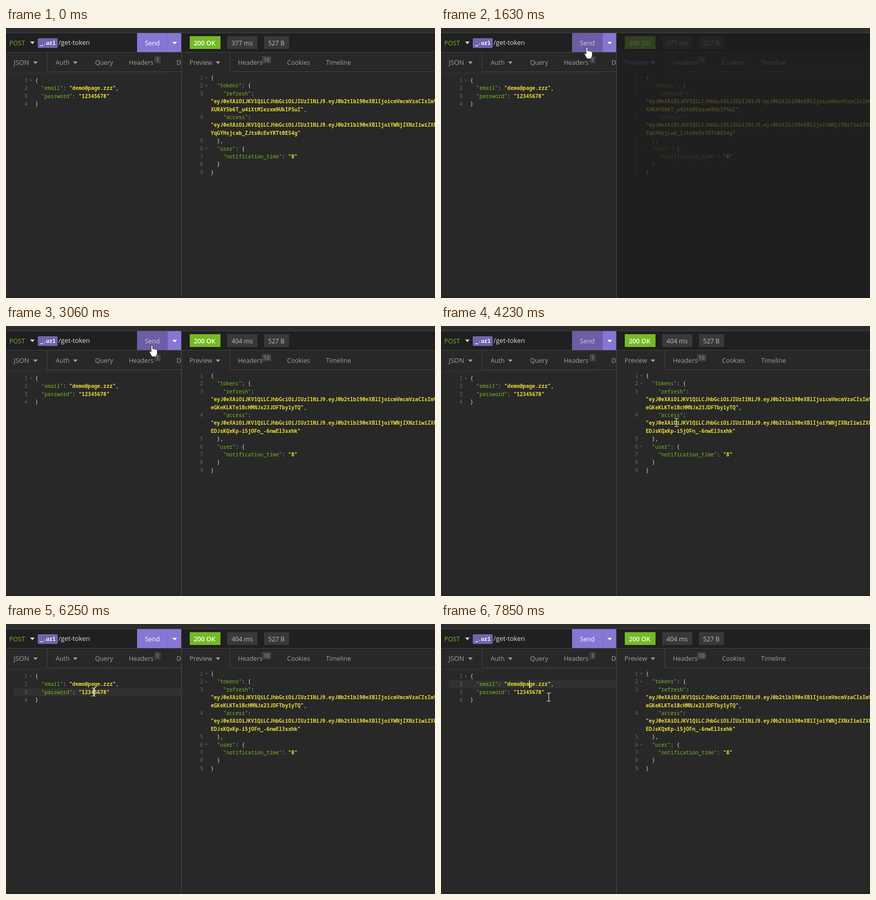
An HTML page for the animation above (8 s loop, 838 by 528 pixels).

```html
<!DOCTYPE html>
<html lang="en">
<head>
<meta charset="utf-8">
<title>Request client</title>
<style>
html, body { margin: 0; width: 100%; height: 100%; overflow: hidden; background: #282828; }
svg { display: block; width: 838px; height: 528px; }
text { white-space: pre; font: 12.3px "Open Sans", "Noto Sans", sans-serif; fill: #a0a0a0; }
.code, .code text { font: 10.08px "Noto Sans Mono", "DejaVu Sans Mono", monospace; fill: #e0e0e0; }
.code .num { fill: #686868; text-anchor: end; }
.code .key { fill: #75ba24; }
.code .str { fill: #e6d938; font-weight: 700; }
.badge { font-size: 10px; }
.tri { fill: #a0a0a0; }
.fold { fill: #585858; }
</style>
</head>
<body>
<svg viewBox="0 0 838 528">
  <defs><clipPath id="left"><rect width="342" height="528"/></clipPath></defs>
  <rect width="838" height="528" fill="#282828"/>
  <rect width="838" height="10" fill="#2d2d2d"/>
  <rect y="10" width="838" height="37" fill="#202020"/>
  <rect y="524" width="838" height="4" fill="#242424"/>
  <path d="M0 9.5H838M0 47.5H838M80.500 48V85.500H342M437.500 48V85.500H838" fill="none" stroke="#444"/>
  <g clip-path="url(#left)">
    <rect id="bar" y="86" width="310" height="5"/>
    <rect id="row" x="15" width="327" height="15.400" fill="#313131"/>
    <g id="request"></g>
    <g id="body" class="code"></g>
    <rect id="caret" x="172" width="1.200" height="15" fill="#f4f4f4"/>
  </g>
  <g id="response"></g>
  <g id="reply" class="code"></g>
  <rect id="veil" x="343" y="10" width="495" height="518" fill="#1c1c1c"/>
  <path d="M342.500 10V528" stroke="#4c4c4c"/>
  <circle id="ring" r="11.500" fill="#e6cf14" opacity=".72"/>
  <g id="pointer" stroke-linejoin="round">
    <path id="arrow" d="M0 0V16.500L3.800 13L6.300 18.700L9 17.500L6.500 12H11.700Z" fill="#fff" stroke="#222" stroke-width=".8"/>
    <path id="hand" d="M-1.600 1.500C-1.600-.500 1.600-.500 1.600 1.500V7C2 5.500 4.500 5.800 4.700 7.500C5.500 6.300 7.500 6.800 7.700 8.300C8.600 7.500 10.500 8 10.500 10V15C10.500 18 8.800 19 8.500 22H-.300C-.700 19.500-3.500 16.500-4.500 13.500C-5.300 11-3 10.500-1.600 13Z" fill="#fff" stroke="#222" stroke-width=".9"/>
    <path id="beam" d="M-4-8H-1.500L0-7L1.500-8H4M0-7V7M-4 8H-1.500L0 7L1.500 8H4" fill="none" stroke="#e2e2e2" stroke-width="1.200"/>
  </g>
</svg>
<script>
const $ = id => document.getElementById(id);
const LOOP = 8000, STEP = 70, PITCH = 15.4;

const rect = (x, y, w, h, fill, more = '') =>
  `<rect x="${x}" y="${y}" width="${w}" height="${h}" fill="${fill}" ${more}/>`;
const label = (x, y, s, more = '') => `<text x="${x}" y="${y}" ${more}>${s}</text>`;
const tri = (x, y, w = 9, h = 5, more = 'class="tri"') =>
  `<path d="M${x} ${y}h${w}l${-w / 2} ${h}z" ${more}/>`;
const badge = (x, w, s) =>
  rect(x, 55, w, 14, '#414141', 'rx="2"') +
  label(x + w / 2, 65.7, s, 'class="badge" text-anchor="middle"');

// Colours one line: indent, key, colon, value, punctuation
function tint(line) {
  const [, pad, key = '', colon, value, tail] =
    line.match(/^(\s*)("\w+"(?=:))?(:? ?)(.*?)([,{}]*)$/);
  return `${pad}<tspan class="key">${key}</tspan>${colon}<tspan class="str">${value}</tspan>${tail}`;
}

// Each row is "number|text"; folds lists the rows with an arrow
function listing(rows, x, y, numX, folds) {
  return rows.map((row, i) => {
    const [num, line] = row.split('|'), base = y + i * PITCH;
    return label(numX, base, num, 'class="num"') +
      label(x, base, tint(line), 'xml:space="preserve"');
  }).join('') + `<g class="folds">${folds.map(i =>
    tri(numX + 4, y - 5 + i * PITCH, 5, 3, 'class="fold"')).join('')}</g>`;
}

const HEAD = '"eyJ0eXAiOiJKV1QiLCJhbGciOiJIUzI1NiJ9.eyJ0b2tlbl90eXBlIjoi';
const reply = (refresh, access) => listing([
  '1|{', '2|  "tokens": {',
  '3|    "refresh":', `|${HEAD}cmVmcmVzaCIsImV4c`, `|${refresh}",`,
  '4|    "access":', `|${HEAD}YWNjZXNzIiwiZXhwI`, `|${access}"`,
  '5|  },', '6|  "user": {', '7|    "notification_time": "8"', '8|  }', '9|}'
], 400, 101, 385, [0, 1, 9]);

$('request').innerHTML =
  label(6.5, 34, 'POST', 'style="fill:#75ba24"') + tri(47, 26.5, 9, 5, 'fill="#ddd"') +
  rect(62, 20, 39, 19, '#7363ab', 'rx="2"') +
  `<g class="code">${label(66.500, 33, '_.url', 'style="fill:#fff;font-weight:700"')}</g>` +
  label(102.5, 33.3, '/get-token', 'style="fill:#ddd;font-size:12.8px"') +
  rect(256, 10, 86, 37, '#8776d5') + rect(256, 10, 60, 37, '#8776d5', 'id="send"') +
  rect(315.5, 10, 1, 37, '#7b6bc2') +
  label(271.5, 34, 'Send', 'id="sendText"') + tri(325, 27, 9, 5, 'fill="#fff"') +
  label(15, 72, 'JSON', 'style="font-size:12.8px"') + tri(53, 65.5) +
  label(97, 72, 'Auth') + tri(131, 65.5) + label(174, 72, 'Query') +
  label(240, 72, 'Headers') + badge(290, 12, '1') + label(333, 72, 'Docs');

$('body').innerHTML = listing(
  ['1|{', '2|  "email": "demo@page.zzz",', '3|  "password": "12345678"', '4|}'],
  57, 106, 42, [0]);

$('response').innerHTML =
  rect(359, 16, 60, 25, '#75ba24') +
  label(367, 34, '200 OK', 'style="fill:#fff;font-weight:600"') +
  rect(432, 16, 59, 25, '#393939') + label(440.5, 34, '', 'id="timing" style="fill:#bbb"') +
  rect(504, 16, 49, 25, '#393939') + label(512, 34, '527 B', 'style="fill:#bbb"') +
  label(358.5, 72, 'Preview') + tri(409.5, 65.5) + label(453, 72, 'Headers') +
  badge(500, 18, '10') + label(549, 72, 'Cookies') + label(625, 72, 'Timeline');

// Pointer path: time, x, y
const path = [
  [400, 763, 512], [610, 610, 335], [820, 430, 170], [960, 335, 88], [1150, 286, 47],
  [1220, 285, 41], [1290, 285, 38], [3670, 285, 38], [3810, 312, 70], [3950, 368, 126],
  [4160, 450, 185], [4440, 490, 200], [4650, 470, 140], [4860, 405, 152], [5060, 420, 252],
  [5270, 367, 226], [5340, 335, 218], [5480, 258, 197], [5700, 176, 152], [5800, 156, 134],
  [5910, 171, 133], [6250, 171, 133], [6530, 172, 121], [6800, 172, 121], [7010, 262, 192],
  [7290, 448, 291], [7500, 434, 285], [7570, 400, 262], [7710, 268, 178], [7850, 210.5, 143]
];

const clamp = v => Math.min(1, Math.max(0, v));
const ramp = (t, a, b) => clamp((t - a) / (b - a));
const during = (t, a, b) => t >= a && t < b;
const show = (el, on) => el.setAttribute('visibility', on ? 'visible' : 'hidden');
const mix = (a, b, k) => `rgb(${a.map((v, i) => Math.round(v + (b[i] - v) * k))})`;

function pointerAt(t) {
  const i = path.findIndex(p => p[0] > t);
  if (i < 0) return path[path.length - 1].slice(1);
  const [t0, x0, y0] = path[Math.max(0, i - 1)], [t1, x1, y1] = path[i];
  const n = Math.max(1, Math.round((t1 - t0) / STEP));
  const k = Math.floor(ramp(t, t0, t1) * n + 1e-6) / n;
  return [x0 + (x1 - x0) * k, y0 + (y1 - y0) * k];
}

function shapeAt(x, y) {
  if (x > 256 && x < 342 && y < 46) return 'hand';
  const gutter = x < 52 || (x > 338 && x < 396);
  return y > 90 && !gutter ? 'beam' : 'arrow';
}

let shown = null;
function setReply(fresh) {
  if (fresh === shown) return;
  shown = fresh;
  $('timing').textContent = fresh ? '404 ms' : '377 ms';
  $('reply').innerHTML = fresh
    ? reply('eGKeKLKTe1BcHMNJx23JDFTby1yTQ', 'EDJsKQxKp-i5jOFn_-6nwEl3sxhk')
    : reply('XURAY5b6T_u4iXtMIezxm9UkIPSuI', 'YqGYHsjcab_ZJts0cEeYRTt0E54g');
}

function draw(t) {
  const [x, y] = pointerAt(t), shape = shapeAt(x, y), moving = t >= 400;
  show($('pointer'), moving);
  $('pointer').setAttribute('transform', `translate(${x} ${y})`);
  for (const id of ['arrow', 'hand', 'beam'])
    $(id).style.display = id === shape ? '' : 'none';

  const overTabs = moving && x < 342 && y >= 46 && y < 92;
  $('bar').setAttribute('fill', overTabs ? '#444' : '#2c2c2c');

  const dark = ramp(t, 1150, 1220) - ramp(t, 6110, 6250);
  $('send').setAttribute('fill', mix([135, 118, 213], [108, 93, 166], dark));
  $('sendText').style.fill = mix([255, 255, 255], [205, 200, 222], dark);

  setReply(t >= 2860);
  show($('reply').querySelector('.folds'), !during(t, 2860, 3340));
  $('veil').setAttribute('opacity', 0.76 * (ramp(t, 1340, 1630) - ramp(t, 2790, 3060)));

  show($('ring'), during(t, 1290, 1430) || during(t, 6110, 6250) || during(t, 6730, 6870));
  $('ring').setAttribute('cx', x);
  $('ring').setAttribute('cy', y + 1);

  const top = t < 6800 ? 125.6 : 110.2;
  $('row').setAttribute('y', top);
  $('caret').setAttribute('y', top);
  show($('row'), t >= 6110);
  show($('caret'), t >= 6110 && !during(t, 7200, 7710));
}

const start = performance.now();
function tick() {
  draw((performance.now() - start) % LOOP);
  requestAnimationFrame(tick);
}
tick();
</script>
</body>
</html>
```
